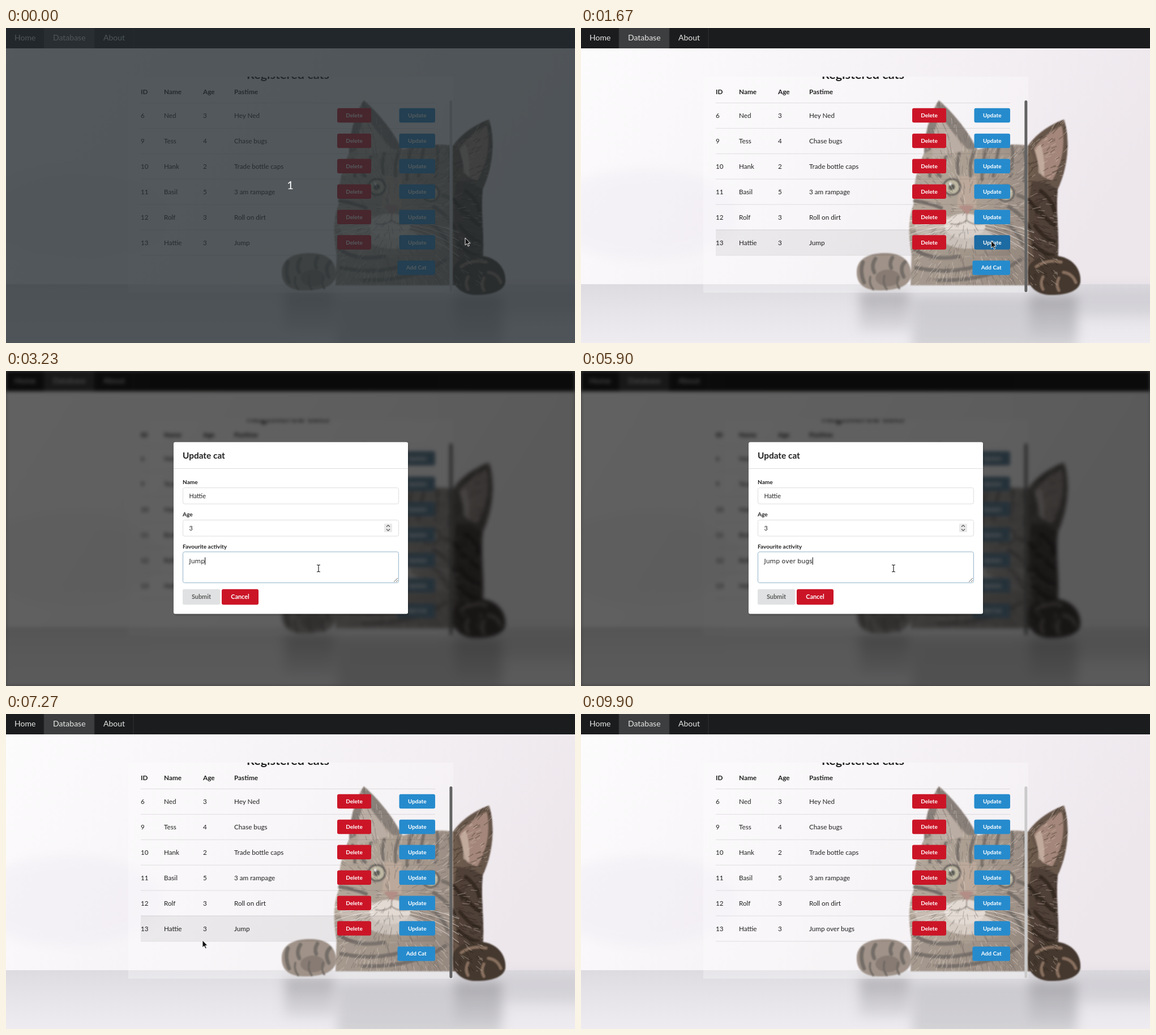
An HTML page that plays this animation: 1005x557 px, repeating every 9960 ms.

```html
<!DOCTYPE html>
<html lang="en">
<head>
<meta charset="utf-8">
<title>Cat database</title>
<style>
  html, body { margin: 0; width: 100%; height: 100%; overflow: hidden; background: #aaa; }
  svg { display: block; width: 1005px; height: 557px; }
  text { font-family: Lato, sans-serif; white-space: pre; }
  .b { font-weight: 700; }
  .mid { text-anchor: middle; }
  .stripes path { fill: none; stroke: #2f251f; stroke-linecap: round; }
</style>
</head>
<body>
<svg id="stage" viewBox="0 0 1005 557" xmlns="http://www.w3.org/2000/svg"></svg>
<script>
const LOOP = 9960;
const INK = 'rgba(0,0,0,.87)';
const BLUE = '#268bcd', RED = '#cb1527';
const ROW_TOP = 132, ROW_H = 44.9;
const OPEN = 1685, CLOSE = 7255, SAVED = 7430, FOCUS = 3130, BLUR_MS = 800;
const BODY = 'M582 455L584 400C576 360 580 330 588 310C586 280 594 245 606 222C606 190 616 150 632 128C660 152 685 185 700 215C730 206 765 204 790 208C802 190 825 172 853 162C864 195 861 245 842 285C838 330 846 370 842 410V455Z';

const cats = [
  [6, 'Ned', 3, 'Hey Ned'],
  [9, 'Tess', 4, 'Chase bugs'],
  [10, 'Hank', 2, 'Trade bottle caps'],
  [11, 'Basil', 5, '3 am rampage'],
  [12, 'Rolf', 3, 'Roll on dirt'],
  [13, 'Hattie', 3, 'Jump']
];
const typed = ' over bugs';
const keyTimes = [4300, 4500, 4700, 4930, 5170, 5170, 5370, 5530, 5730, 5900];

// Pointer path: time, x, y
const track = [
  [0, 811, 371], [650, 811, 371], [930, 724.5, 376], [2490, 724.5, 376],
  [2930, 552, 349], [6550, 552, 349], [7020, 347, 400], [7550, 347, 400],
  [7970, 160, 301], [9050, 160, 301], [9690, 3, -18], [LOOP, 3, -18]
];

const text = (x, y, size, s, cls = '', fill = INK, extra = '') =>
  `<text x="${x}" y="${y}" font-size="${size}" class="${cls}" fill="${fill}" ${extra}>${s}</text>`;
const rect = (x, y, w, h, fill, extra = '') =>
  `<rect x="${x}" y="${y}" width="${w}" height="${h}" fill="${fill}" ${extra}/>`;
const button = (x, y, w, h, fill, label, size, id = '', ink = '#fff') =>
  rect(x, y, w, h, fill, `rx="3" ${id && `id="${id}"`}`) +
  text(x + w / 2, y + h / 2 + size * .35, size, label, 'b mid', ink);
const field = (y, h, id = '') =>
  rect(312.5, y, 381, h, '#fff', `rx="3" stroke="#dededf" ${id && `id="${id}"`}`);
const strokes = (width, list) => list.map(d => `<path d="${d}" stroke-width="${width}"/>`).join('');

function defs() {
  const stops = list => list.map(([o, c, a = 1]) =>
    `<stop offset="${o}" stop-color="${c}" stop-opacity="${a}"/>`).join('');
  return `<defs>
    <linearGradient id="wall" x2="1" y2=".35">${stops([[0, '#fdfcfd'], [.5, '#f6f3f6'], [1, '#ede7ec']])}</linearGradient>
    <linearGradient id="desk" x2="0" y2="1">${stops([[0, '#dddbe0'], [.4, '#e5e3e8'], [1, '#eeecf0']])}</linearGradient>
    <linearGradient id="mirror" x2="0" y2="1">${stops([[0, '#8f8e92', .6], [1, '#a9a8ac', .2]])}</linearGradient>
    <linearGradient id="fur" x1="0" x2="1">${stops([[0, '#93816f'], [.45, '#857261'], [.75, '#6f5c4e'], [1, '#62524a']])}</linearGradient>
    <filter id="soft"><feGaussianBlur stdDeviation="1.1"/></filter>
    <filter id="haze" x="-50%" y="-50%" width="200%" height="200%"><feGaussianBlur stdDeviation="10"/></filter>
    <clipPath id="panel"><rect x="216" y="86" width="574" height="382"/></clipPath>
    <clipPath id="body"><path d="${BODY}"/></clipPath>
  </defs>`;
}

// Short hairs that fan out from the nose
function hairs(count, seed) {
  const random = () => (seed = (seed * 16807) % 2147483647) / 2147483647;
  let d = '';
  for (let i = 0; i < count; i++) {
    const x = 575 + random() * 285, y = 130 + random() * 325;
    const a = Math.atan2(y - 322, x - 681) + (random() - .5) * .6, len = 6 + random() * 9;
    d += `M${x.toFixed(1)} ${y.toFixed(1)}l${(Math.cos(a) * len).toFixed(1)} ${(Math.sin(a) * len).toFixed(1)}`;
  }
  return d;
}

function cat() {
  const eye = (x, y) => `<ellipse cx="${x}" cy="${y}" rx="17" ry="16" fill="#2b221d"/>
    <ellipse cx="${x}" cy="${y}" rx="12.5" ry="12" fill="#a39a7c"/>
    <circle cx="${x}" cy="${y}" r="6" fill="#15120f"/><circle cx="${x - 3}" cy="${y - 5}" r="2" fill="#fff"/>`;
  const whiskers = [0, 1, 2, 3].map(i =>
    `<path d="M650 ${340 + i * 5}Q610 ${335 + i * 9} 576 ${342 + i * 13}M712 ${342 + i * 5}Q760 ${345 + i * 9} 800 ${362 + i * 14}"/>`).join('');
  return `<g filter="url(#soft)">
    <path fill="url(#fur)" d="${BODY}"/>
    <path fill="#57493f" d="M632 128C613 162 606 196 606 222L618 216L634 158L682 214L700 215C685 185 660 152 632 128Z"/>
    <path fill="#9c897c" d="M633 154C623 184 618 206 622 230L676 216C662 190 646 170 633 154Z"/>
    <path fill="#66554a" d="M790 208C802 190 825 172 853 162C864 195 861 245 842 285L822 282Z"/>
    <path fill="#a4877a" d="M800 213C813 195 832 181 849 173C856 205 850 240 832 270L814 262Z"/>
    <path fill="#cdb9ac" d="M802 216Q808 232 808 256L818 262Q820 232 812 205Z" opacity=".7"/>
    <ellipse cx="624" cy="352" rx="34" ry="26" fill="#b3a294"/>
    <ellipse cx="684" cy="372" rx="46" ry="18" fill="#c4b6aa"/>
    <ellipse cx="678" cy="350" rx="36" ry="22" fill="#d6cac0"/>
    <path fill="#9f8470" d="M670 262L698 262L698 318H664Z"/>
    <path fill="#42352d" d="M796 270Q824 272 842 286C838 330 846 370 842 410H800Q784 340 796 270Z" opacity=".65"/>
    <path fill="#5a493d" d="M584 398Q640 416 700 402T800 384V455H582Z" opacity=".35"/>
    <g class="stripes" opacity=".8">
      ${strokes(6, ['M694 218Q686 240 688 262', 'M716 213Q708 240 708 268', 'M738 211Q734 232 728 262', 'M668 222Q664 240 666 258', 'M645 228Q640 242 630 258', 'M762 210Q764 234 758 262', 'M782 215Q790 240 782 270', 'M612 232Q618 244 616 262'])}
      ${strokes(7, ['M606 250Q620 244 634 262', 'M594 282Q612 280 630 292', 'M590 306Q612 308 636 318', 'M772 296Q798 304 806 326', 'M756 316Q784 334 792 356', 'M736 334Q768 352 780 382', 'M590 392Q620 412 668 404', 'M592 424Q660 438 720 414', 'M630 446Q720 448 776 410'])}
      ${strokes(7, ['M812 288Q832 304 836 324', 'M806 318Q822 340 836 348', 'M802 350Q820 374 836 378', 'M800 384Q818 400 834 402'])}
    </g>
    ${eye(655, 281)}${eye(750, 292)}
    <path fill="#905d53" d="M667 315Q680 311 694 315L682 331Z"/>
    <path fill="none" stroke="#54433a" stroke-width="2" d="M681 330V340Q670 350 652 346M681 340Q692 350 712 346"/>
    <path fill="#766355" d="M487 430C488 406 512 397 540 398C568 399 584 412 583 438C580 458 556 464 526 464C500 464 486 452 487 430Z"/>
    <ellipse cx="542" cy="442" rx="22" ry="15" fill="#49392f" opacity=".75"/>
    <path fill="#45372f" d="M788 430C792 408 815 400 842 403C870 407 884 428 882 450C878 468 850 473 826 472C800 470 786 452 788 430Z"/>
    <g class="stripes" opacity=".85">
      ${strokes(7, ['M498 414Q492 430 500 450', 'M520 408Q512 420 518 432', 'M550 406Q544 416 548 424', 'M572 414Q562 424 570 440'])}
      ${strokes(4, ['M511 440Q508 452 516 462', 'M536 438Q532 452 540 462', 'M560 440Q556 452 562 460'])}
    </g>
    <g fill="none" stroke="#88705f" stroke-width="5" stroke-linecap="round">
      <path d="M804 422Q824 408 848 414M852 432Q868 434 874 450M816 440Q810 452 816 462M844 442Q838 454 844 464"/>
    </g>
  </g>
  <g clip-path="url(#body)" fill="none" stroke-width="1.4" opacity=".3">
    <path d="${hairs(700, 11)}" stroke="#1f1712"/><path d="${hairs(500, 29)}" stroke="#e0d2c4"/>
  </g>
  <g fill="none" stroke="#fff" stroke-width=".8" opacity=".75">${whiskers}</g>`;
}

function scenery() {
  return rect(0, 0, 1005, 557, 'url(#wall)') +
    `<ellipse cx="110" cy="330" rx="170" ry="80" fill="#eae6f1" opacity=".35" filter="url(#haze)"/>` +
    rect(0, 453, 1005, 104, 'url(#desk)') +
    `<g filter="url(#haze)">
      ${rect(492, 466, 88, 70, 'url(#mirror)')}
      ${rect(585, 475, 290, 95, '#a9a8ad', 'opacity=".4"')}
      ${rect(792, 470, 86, 75, 'url(#mirror)')}
      ${rect(880, 460, 150, 50, '#b5b4b9', 'opacity=".35"')}
    </g>` + cat();
}

function page() {
  const nav = rect(0, 0, 1005, 36, '#1b1c1d') + rect(67, 0, 89, 36, '#3d3e3f') +
    [67, 156, 225].map(x => rect(x - .5, 0, 1, 36, '#303132')).join('') +
    [[15, 'Home'], [83, 'Database'], [172, 'About']].map(([x, s]) => text(x, 22, 14, s, '', '#e8e8e8')).join('');
  const cols = [238, 279, 348, 403];
  const heads = ['ID', 'Name', 'Age', 'Pastime'].map((s, i) => text(cols[i], 117, 11.8, s, 'b')).join('');
  const rows = cats.map((c, r) => {
    const y = ROW_TOP + r * ROW_H;
    return rect(238, y, 520, 1, 'rgba(34,36,38,.12)') +
      c.map((s, i) => text(cols[i], y + 27.2, 11.7, s, '', INK, r === 5 && i === 3 ? 'id="pastime"' : '')).join('') +
      button(585, y + 9.8, 60, 25.5, RED, 'Delete', 10) +
      button(694.5, y + 9.8, 63.5, 25.5, BLUE, 'Update', 10, r === 5 ? 'update' : '');
  }).join('');
  return `<g id="page">${scenery()}${rect(216, 86, 574, 382, '#fff', 'opacity=".3"')}${nav}
    <g clip-path="url(#panel)">${text(498, 89.8, 21.6, 'Registered cats', 'b mid')}</g>
    ${heads}${rect(238, 0, 520, ROW_H, 'rgba(0,0,0,.06)', 'id="hover"')}${rows}
    ${rect(238, ROW_TOP + 6 * ROW_H, 520, 1, 'rgba(34,36,38,.12)')}
    ${button(691.5, 411.2, 66.5, 25.5, BLUE, 'Add Cat', 10)}
    ${rect(783.4, 128, 5, 339, '#626262', 'rx="2.5" id="bar"')}</g>`;
}

function modal() {
  return `<g id="modal">${rect(0, 0, 1005, 557, 'rgba(0,0,0,.61)')}
    ${rect(297, 129, 414, 303, 'rgba(0,0,0,.2)', 'rx="4" filter="url(#soft)"')}
    ${rect(296, 125.7, 414, 303.8, '#fff', 'rx="3"')}
    ${rect(296, 172, 414, 1, '#dededf')}
    ${text(312, 154.5, 15.4, 'Update cat', 'b')}
    ${text(312, 200, 10.1, 'Name', 'b')}${field(206.5, 28.5)}${text(323.5, 224.6, 10.9, cats[5][1])}
    ${text(312, 256.8, 10.1, 'Age', 'b')}${field(263.5, 28.5)}${text(323.5, 281.8, 10.9, '3')}
    ${rect(668, 270, 14, 15, '#e9e9ea', 'rx="1"')}
    <path d="M672 275.5L675 272.5L678 275.5M672 279.5L675 282.5L678 279.5" fill="none" stroke="#555" stroke-width="1.2"/>
    ${text(312, 313.5, 10.1, 'Favourite activity', 'b')}${field(319.8, 54.7, 'area')}
    ${text(323.5, 339.6, 10.9, '', '', INK, 'id="entry" style="font-family:\'DejaVu Sans\',sans-serif"')}
    ${rect(0, 329.5, 1, 13, '#000', 'id="caret"')}
    <path d="M685 373L692 366M689 373L692 370" stroke="#666" stroke-width="1" fill="none"/>
    ${button(312, 385.8, 66, 27.4, '#e0e1e2', 'Submit', 10.9, 'submit', 'rgba(0,0,0,.6)')}
    ${button(381, 385.8, 65, 27.4, RED, 'Cancel', 10.9)}</g>`;
}

function overlay() {
  return `<g id="count">${rect(0, 0, 1005, 557, 'rgba(35,43,47,.78)')}
    ${text(502, 285, 20, '1', 'mid', '#fff')}</g>
    <path id="arrow" d="M0 0V13L3 10.3L5.3 15L7.3 14L5.1 9.6H9Z" fill="#111" stroke="#fff" stroke-width=".9"/>
    <g id="beam" fill="none"><path d="M-3 -6H-1L0 -5L1 -6H3M0 -5V5M-3 6H-1L0 5L1 6H3" stroke="#fff" stroke-width="2.4"/>
    <path d="M-3 -6H-1L0 -5L1 -6H3M0 -5V5M-3 6H-1L0 5L1 6H3" stroke="#111" stroke-width="1.1"/></g>`;
}

document.getElementById('stage').innerHTML = defs() + page() + modal() + overlay();
const el = {};
for (const node of document.querySelectorAll('[id]')) el[node.id] = node;

const show = (node, on) => node.style.display = on ? '' : 'none';
const inside = (p, x, y, w, h) => p.x >= x && p.x < x + w && p.y >= y && p.y < y + h;
const smooth = u => u * u * (3 - 2 * u);

// CSS "ease": cubic-bezier(.25, .1, .25, 1)
function ease(x) {
  const curve = (a, b, s) => 3 * a * s * (1 - s) ** 2 + 3 * b * s * s * (1 - s) + s ** 3;
  let lo = 0, hi = 1;
  for (let i = 0; i < 20; i++) {
    const m = (lo + hi) / 2;
    if (curve(.25, .25, m) < x) lo = m; else hi = m;
  }
  return curve(.1, 1, lo);
}

function pointer(t) {
  const i = track.findIndex(k => k[0] > t);
  const [t0, x0, y0] = track[i - 1], [t1, x1, y1] = track[i];
  const u = smooth((t - t0) / (t1 - t0));
  return { x: x0 + (x1 - x0) * u, y: y0 + (y1 - y0) * u };
}

function draw(t) {
  const p = pointer(t);
  const open = t >= OPEN && t < CLOSE;
  const counting = t < 30;

  show(el.count, counting);
  show(el.modal, open);
  const k = open ? ease(Math.min(1, (t - OPEN) / BLUR_MS)) : 0;
  el.page.style.filter = open ? `blur(${3 * k}px) grayscale(${.7 * k})` : 'none';
  el.bar.setAttribute('fill', counting || t >= 9900 ? '#cbcacb' : '#626262');

  const row = Math.floor((p.y - ROW_TOP) / ROW_H);
  show(el.hover, !open && p.x >= 238 && p.x < 758 && row >= 0 && row < 6);
  el.hover.setAttribute('y', ROW_TOP + row * ROW_H);
  const onUpdate = !open && inside(p, 694.5, 366.3, 63.5, 25.5);
  el.update.setAttribute('fill', !onUpdate ? BLUE : t >= 1500 ? '#1d6ba3' : '#1c79be');
  el.pastime.textContent = t >= SAVED ? 'Jump' + typed : 'Jump';

  if (open) {
    const focused = t >= FOCUS && t < 7120;
    el.entry.textContent = 'Jump' + typed.slice(0, keyTimes.filter(s => s <= t).length);
    el.area.setAttribute('stroke', focused ? '#93b4c9' : '#dededf');
    show(el.caret, focused);
    el.caret.setAttribute('x', 323.5 + el.entry.getComputedTextLength());
    el.submit.setAttribute('fill', inside(p, 312, 385.8, 66, 27.4) ? '#cacbcd' : '#e0e1e2');
  }

  const beam = open && inside(p, 312, 319.8, 381, 54.7);
  show(el.beam, beam);
  show(el.arrow, !beam);
  (beam ? el.beam : el.arrow).setAttribute('transform', `translate(${p.x} ${p.y})`);
}

const start = performance.now();
function tick() {
  draw((performance.now() - start) % LOOP);
  requestAnimationFrame(tick);
}
draw(0);
requestAnimationFrame(tick);
</script>
</body>
</html>
```
